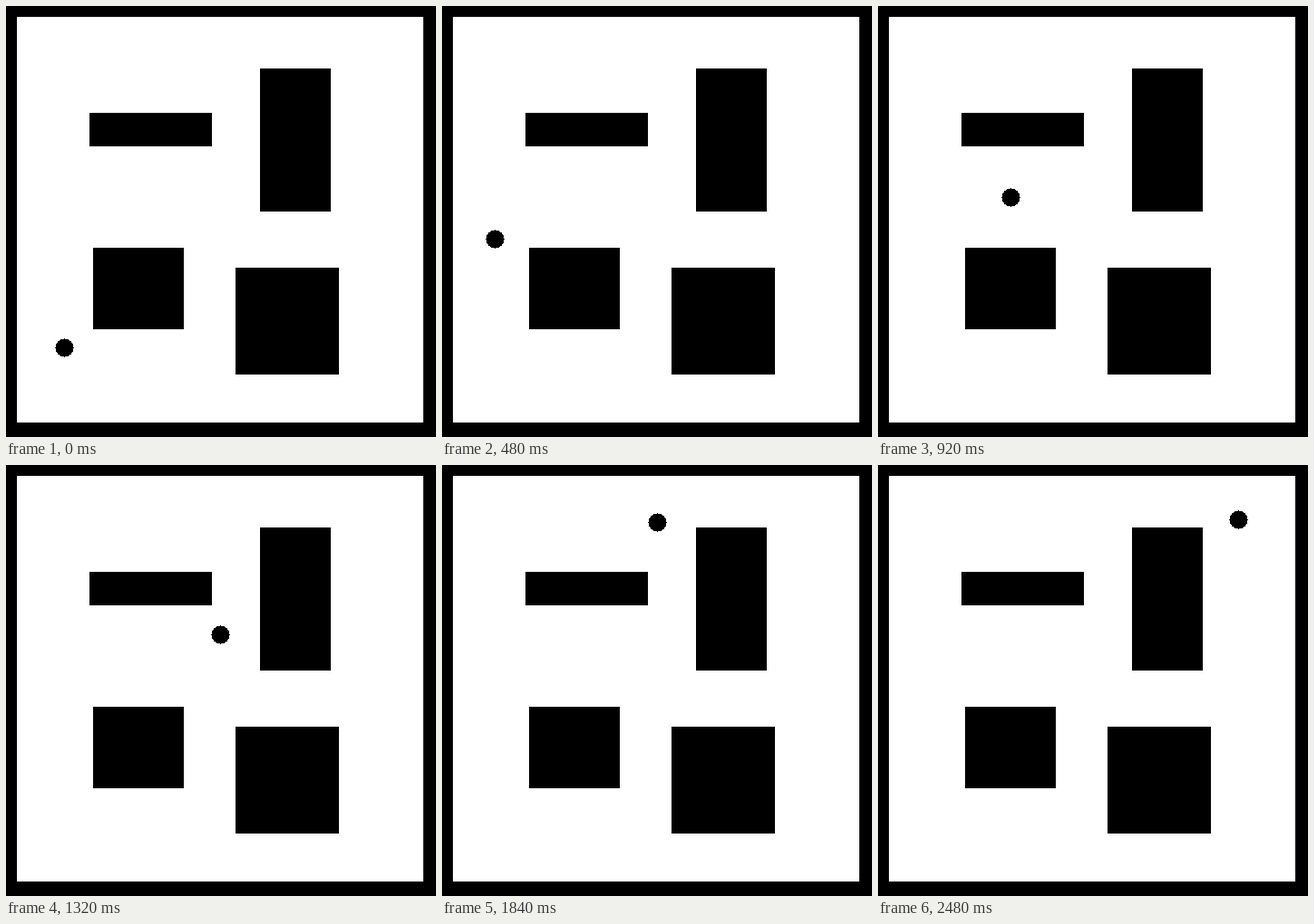
Animation, 474 px wide and 476 px high, one loop 2.52 s. Source, as an HTML page:

```html
<!DOCTYPE html>
<html lang="en">
<head>
<meta charset="utf-8">
<title>Path through obstacles</title>
<style>
  html, body { margin: 0; width: 100%; height: 100%; overflow: hidden; background: #000; }
  svg { display: block; }
</style>
</head>
<body>
<svg width="474" height="476" viewBox="0 0 474 476" shape-rendering="crispEdges">
  <rect width="474" height="476"/>
  <rect x="12" y="12" width="448" height="448" fill="#fff"/>
  <rect x="92" y="118" width="135" height="37"/>
  <rect x="280" y="69" width="78" height="158"/>
  <rect x="96" y="267" width="100" height="90"/>
  <rect x="253" y="289" width="114" height="118"/>
  <circle id="dot" cx=".5" cy=".5" r="10.03" transform="translate(64 377)"/>
</svg>
<script>
  const TICK = 40, TICKS = 63, STEP = 10;
  const corners = [
    [64, 377], [53, 307], [58, 257], [80, 213], [146, 211], [196, 217],
    [232, 201], [254, 122], [228, 66], [297, 40], [337, 40], [397, 60]
  ];
  const dot = document.getElementById('dot');
  let start;

  // Walk the corners, measuring each leg along its longer axis.
  function pointAt(dist) {
    let [x, y] = corners[0];
    for (const [nx, ny] of corners.slice(1)) {
      const dx = nx - x, dy = ny - y;
      const leg = Math.max(Math.abs(dx), Math.abs(dy));
      if (dist <= leg) return [x + dx * dist / leg, y + dy * dist / leg].map(Math.round);
      dist -= leg;
      [x, y] = [nx, ny];
    }
    return [x, y];
  }

  function draw(now) {
    start ??= now;
    const tick = Math.floor((now - start) / TICK) % TICKS;
    dot.setAttribute('transform', `translate(${pointAt(tick * STEP).join(' ')})`);
    requestAnimationFrame(draw);
  }
  requestAnimationFrame(draw);
</script>
</body>
</html>
```
